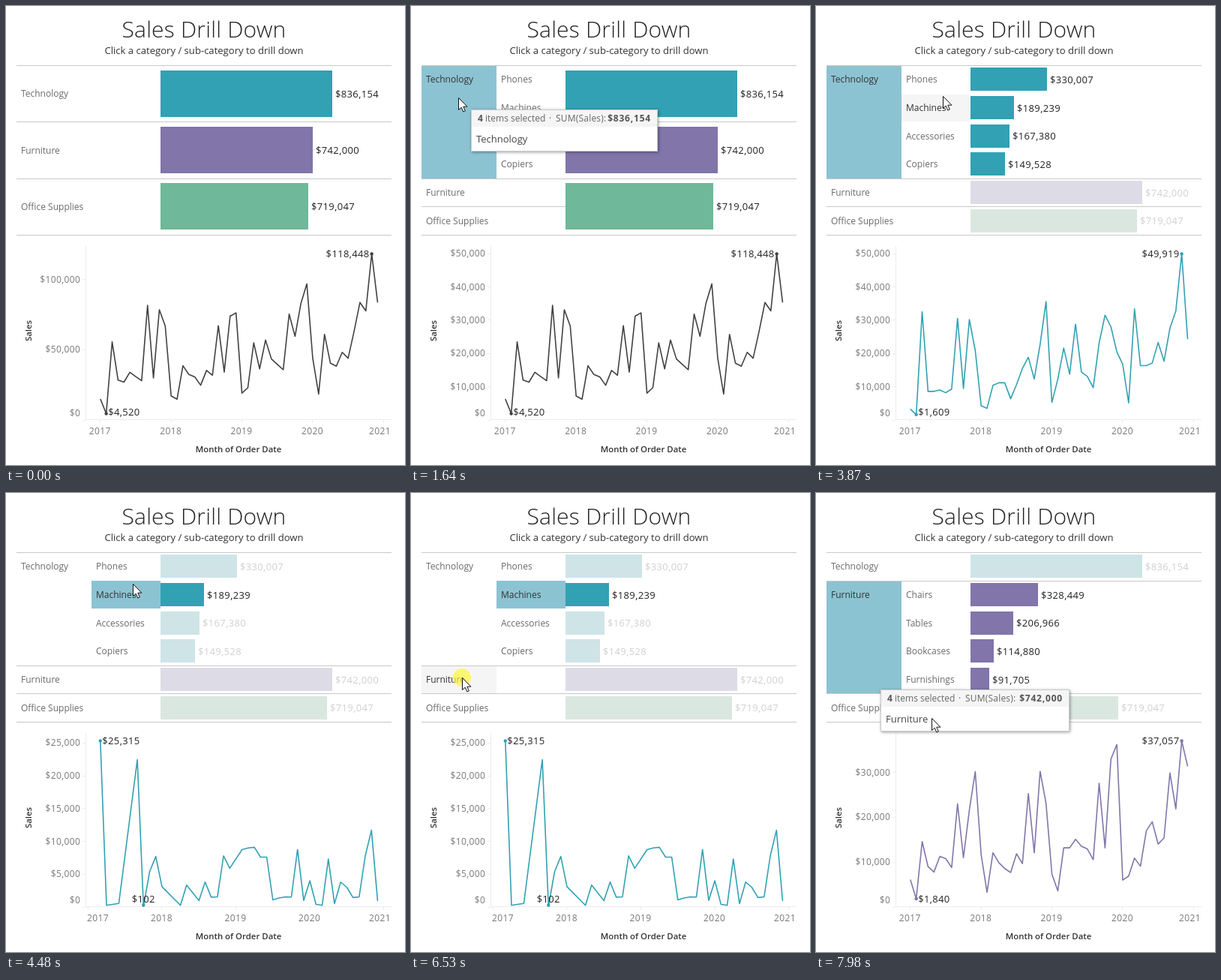
Write an HTML page with a canvas that moves like this. It is 532x612 px and loops after 8000 ms.

```html
<!DOCTYPE html>
<html lang="en">
<head>
<meta charset="utf-8">
<title>Sales Drill Down</title>
<style>
html, body { margin: 0; width: 100%; height: 100%; overflow: hidden; background: #fff; }
canvas { display: block; width: 532px; height: 612px; }
</style>
</head>
<body>
<canvas id="stage"></canvas>
<script>
const W = 532, H = 612, LOOP = 8000;
const canvas = document.getElementById("stage");
const ctx = canvas.getContext("2d");
const ratio = window.devicePixelRatio || 1;
canvas.width = W * ratio;
canvas.height = H * ratio;

const GROUPS = [
  { name: "Technology", color: "#31a1b3", pale: "#cfe4e7", total: 836154,
    items: [["Phones", 330007], ["Machines", 189239], ["Accessories", 167380], ["Copiers", 149528]] },
  { name: "Furniture", color: "#8175aa", pale: "#dddbe5", total: 742000,
    items: [["Chairs", 328449], ["Tables", 206966], ["Bookcases", 114880], ["Furnishings", 91705]] },
  { name: "Office Supplies", color: "#6fb899", pale: "#dae7e1", total: 719047, items: [] }
];

// Monthly sales in thousands: a season that grows each year, with a few outstanding months.
function yearly(season, growth, outliers) {
  return Array.from({ length: 48 }, (_, i) =>
    outliers[i] ?? season[i % 12] * (1 + growth * Math.floor(i / 12)));
}

// Sporadic sales: peaks above a slow ripple; null marks a month without sales.
function sporadic(count, idle, peaks) {
  const ripple = i => .9 + .65 * Math.cos((i - 30.4) * Math.PI * 2 / 11.7);
  return Array.from({ length: count }, (_, i) => idle.includes(i) ? null : peaks[i] ?? ripple(i));
}

const CHARTS = {
  all: {
    color: "#414141", step: 50, skip: 0,
    v: yearly([15, 13, 43, 28.5, 27, 34, 31, 28, 59, 30, 65, 67], .14,
      { 1: 4.52, 2: 55.7, 8: 81.8, 10: 78.6, 14: 38.7, 17: 24.8, 25: 23, 28: 57,
        33: 59.7, 35: 97, 36: 44, 43: 63, 45: 77.8, 46: 118.448, 47: 83.8 }),
    marks: [[46, "$118,448", "right"], [1, "$4,520", "left"]]
  },
  tech: {
    color: "#31a1b3", step: 10, skip: 0,
    v: yearly([3.3, 2.7, 13.5, 8.6, 8.6, 9, 8.2, 9.3, 14.5, 9.5, 17.5, 12.8], .3,
      { 1: 1.61, 2: 32.5, 8: 30.5, 10: 30.2, 11: 20.9, 14: 10.4, 17: 6.4, 19: 15.5, 23: 35.6,
        25: 12.3, 28: 28.8, 31: 9.7, 33: 31.5, 36: 16.7, 38: 33.4, 42: 23.3, 45: 32.8, 46: 49.919 }),
    marks: [[46, "$49,919", "right"], [1, "$1,609", "left"]]
  },
  mach: {
    color: "#31a1b3", step: 5, skip: 2,
    v: sporadic(46, [2, 4, 5, 11, 12, 15, 22],
      { 0: 25.315, 6: 22.45, 7: .1, 8: 5.4, 9: 7.7, 10: 3.1, 14: 3.35, 17: 3.8, 20: 7.8, 21: 5.9,
        23: 8.75, 24: 9, 25: 9.1, 26: 7.6, 27: 7.6, 32: 8.75, 34: 4, 37: 7.3, 39: 3.8, 40: 3,
        43: 7.8, 44: 11.7 }),
    marks: [[0, "$25,315", "left"], [7, "$102", "center"]]
  },
  furn: {
    color: "#8175aa", step: 10, skip: 0,
    v: yearly([6.1, 3, 11, 9, 7.8, 11.3, 10.8, 8.8, 23, 11, 27.5, 30.2], .1,
      { 1: 1.84, 2: 14.6, 10: 21.6, 12: 11.7, 17: 7.7, 23: 23.1, 27: 13.2, 28: 15.1, 36: 6, 37: 6.9,
        38: 10.9, 39: 9.1, 40: 17, 41: 19, 43: 15.4, 45: 21.9, 46: 37.057, 47: 31.4 }),
    marks: [[46, "$37,057", "right"], [1, "$1,840", "left"]]
  }
};

const VIEWS = {
  all: { chart: CHARTS.all },
  tech: { open: "Technology", pick: "Technology", chart: CHARTS.tech },
  mach: { open: "Technology", pick: "Machines", chart: CHARTS.mach },
  machIdle: { open: "Technology", chart: CHARTS.mach },
  furn: { open: "Furniture", pick: "Furniture", chart: CHARTS.furn }
};

// Start time, headers and axis, bars and line.
const STATES = [
  [0, "all", "all"], [1640, "tech", "all"], [1680, "tech", "tech"], [4480, "mach", "mach"],
  [6630, "machIdle", "mach"], [6920, "furn", "mach"], [6960, "furn", "furn"]
];

const TIPS = [
  { from: 1640, to: 3500, x: 80, y: 138, w: 249, title: "Technology", sum: "$836,154" },
  { from: 6920, to: LOOP, x: 86, y: 262, w: 252, title: "Furniture", sum: "$742,000" }
];

const CLICKS = [[1210, 1350], [4190, 4350], [6530, 6630]];

// Start time, end time, way points.
const MOVES = [
  [180, 920, [398, 606], [230, 425], [78, 240], [63, 122]],
  [2620, 3010, [63, 122], [170, 180]],
  [3410, 3900, [170, 180], [172, 72], [169, 121]],
  [5430, 6040, [169, 121], [175, 145], [102, 222], [68, 246]],
  [7450, 7980, [68, 246], [67, 272], [154, 300]]
];

const LEFT = 14, MID = 114, BARS = 206, RIGHT = 514, TOP = 79.5, DEPTH = 226;
const BASE = 552, RISE = 221.5, X0 = 125.8, SPAN = 369.7;

const money = n => "$" + n.toLocaleString("en-US");
const clamp = (n, lo, hi) => Math.min(hi, Math.max(lo, n));

function text(str, x, y, { size = 12, color = "#666", align = "left", weight = 400, gap = 0 } = {}) {
  ctx.font = `${weight} ${size}px "Open Sans", "Noto Sans", sans-serif`;
  ctx.letterSpacing = gap + "px";
  ctx.textAlign = align;
  ctx.fillStyle = color;
  ctx.fillText(str, x, y);
}

function rect(x, y, w, h, color) {
  ctx.fillStyle = color;
  ctx.fillRect(x, y, w, h);
}

function dot(x, y, r, color) {
  ctx.fillStyle = color;
  ctx.beginPath();
  ctx.arc(x, y, r, 0, Math.PI * 2);
  ctx.fill();
}

// Rows of the table, each with its group, label, amount and vertical place.
function rowsOf(view) {
  const rows = [];
  for (const group of GROUPS) {
    const open = group.name === view.open;
    const list = open ? group.items : [["", group.total]];
    list.forEach(([label, amount], i) => rows.push({ group, label, amount, open, first: i === 0 }));
  }
  const h = DEPTH / rows.length;
  rows.forEach((row, i) => Object.assign(row, { y: TOP + i * h, h, mid: TOP + (i + .5) * h }));
  return rows;
}

function cellsOf(view) {
  const cells = [];
  for (const { group, label, open, first, y, h, mid } of rowsOf(view)) {
    if (first) {
      const span = open ? h * group.items.length : h;
      cells.push({ name: group.name, x: LEFT, w: MID - LEFT, y, h: span, mid });
    }
    if (label) cells.push({ name: label, x: MID, w: BARS - MID, y, h, mid });
  }
  return cells;
}

const inside = (p, b) => p && p[0] >= b.x && p[0] < b.x + b.w && p[1] >= b.y && p[1] < b.y + b.h;

function separators(view, from, to) {
  const ys = rowsOf(view).filter(r => r.first).map(r => r.y).concat(TOP + DEPTH);
  for (const y of ys) rect(from, Math.floor(y), to - from, 1, "#c8c8c8");
}

function headers(view, pointer) {
  for (const cell of cellsOf(view)) {
    const picked = cell.name === view.pick;
    const hover = inside(pointer, cell);
    if (picked || hover) {
      const y = Math.floor(cell.y) + (picked && cell.x === MID ? 0 : 1);
      rect(cell.x, y, cell.w, Math.floor(cell.y + cell.h) - y, picked ? "#8cc3d2" : "#f5f5f5");
    }
    text(cell.name, cell.x + 6, Math.round(cell.mid + 4), { color: hover || picked ? "#333" : "#6a6a6a" });
  }
  separators(view, LEFT, BARS);
}

function bars(view) {
  const rows = rowsOf(view);
  const max = Math.max(...rows.map(r => r.amount));
  separators(view, BARS, RIGHT);
  for (const { group, label, amount, open, h, mid } of rows) {
    const live = !view.open || open && (view.pick === group.name || view.pick === label);
    const w = Math.round(229 * amount / max);
    const bh = Math.round(h * .823);
    rect(BARS, Math.floor(mid - bh / 2), w, bh, live ? group.color : group.pale);
    text(money(amount), BARS + w + 4, Math.round(mid + 4.5),
      { size: 13, color: live ? "#222" : "#d0d0d0", gap: .35 });
  }
}

function axes(chart) {
  const max = Math.max(...chart.v);
  const faint = "#ececec";
  rect(106, 320, 1, 232, faint);
  rect(106, 551, 408, 1, faint);
  for (let n = 0; n <= max + .1; n += chart.step) {
    const y = BASE - RISE * n / max;
    rect(102, Math.round(y - .5), 4, 1, faint);
    text(money(n * 1000), 99.3, Math.round(Math.min(y, 542.5) + 4), { color: "#787878", align: "right", gap: .4 });
  }
  for (let k = 0; k < 5; k++) {
    const x = X0 + (12 * k - chart.skip) * SPAN / (chart.v.length - 1);
    if (x > 107) rect(Math.round(x - .5), 552, 1, 4, faint);
    text(String(2017 + k), clamp(x - .5, 122.5, 498.5), 571, { color: "#787878", align: "center", gap: .4 });
  }
  const label = { color: "#333", align: "center", weight: 600, size: 11.4 };
  text("Month of Order Date", 310, 595, label);
  ctx.save();
  ctx.translate(34, 433);
  ctx.rotate(-Math.PI / 2);
  text("Sales", 0, 0, label);
  ctx.restore();
}

function line(chart) {
  const { v, color, marks } = chart;
  const max = Math.max(...v);
  const at = i => [X0 + i * SPAN / (v.length - 1), BASE - RISE * v[i] / max];
  ctx.strokeStyle = color;
  ctx.lineWidth = 1.6;
  ctx.lineJoin = "round";
  ctx.beginPath();
  v.forEach((n, i) => { if (n !== null) ctx.lineTo(...at(i)); });
  ctx.stroke();
  for (const [i, str, align] of marks) {
    const [x, y] = at(i);
    dot(x, Math.min(y, 549.5), 2.2, color);
    const shift = { left: 2.5, right: -3, center: 0 }[align];
    text(str, x + shift, Math.floor(Math.min(y, 541) + 5), { size: 13, color: "#222", align, gap: .35 });
  }
}

function tooltip({ x, y, w, title, sum }) {
  const h = 56;
  ctx.save();
  ctx.shadowColor = "rgba(0,0,0,.4)";
  ctx.shadowBlur = 4 * ratio;
  ctx.shadowOffsetX = ctx.shadowOffsetY = ratio;
  rect(x, y, w, h, "#fff");
  ctx.restore();
  rect(x, y, w, 23, "#f5f5f5");
  ctx.strokeStyle = "#ccc";
  ctx.lineWidth = 1;
  ctx.strokeRect(x + .5, y + .5, w - 1, h - 1);
  const base = y + 16;
  text("4", x + 9, base, { weight: 700, color: "#555" });
  text("items selected", x + 19, base);
  text("·", x + 104, base);
  text("SUM(Sales):", x + 113, base, { gap: .2 });
  text(sum, x + w - 9, base, { weight: 700, color: "#555", align: "right", gap: .8 });
  text(title, x + 7, y + 44, { size: 13, color: "#444" });
}

function pointerAt(t) {
  let pos = null;
  for (const [from, to, ...pts] of MOVES) {
    if (t < from) break;
    const p = clamp((t - from) / (to - from), 0, 1);
    const s = p * p * (3 - 2 * p) * (pts.length - 1);
    const i = Math.min(Math.floor(s), pts.length - 2);
    const [a, b] = [pts[i], pts[i + 1]];
    pos = a.map((n, k) => Math.round(n + (b[k] - n) * (s - i)));
  }
  return pos;
}

function arrow([x, y]) {
  const shape = [[0, 0], [0, 16], [3.7, 12.7], [6.3, 18.5], [8.8, 17.4], [6.3, 11.7], [11.4, 11.7]];
  ctx.beginPath();
  for (const [dx, dy] of shape) ctx.lineTo(x + .5 + dx, y + .5 + dy);
  ctx.closePath();
  ctx.fillStyle = "#fff";
  ctx.fill();
  ctx.strokeStyle = "#111";
  ctx.lineWidth = 1;
  ctx.lineJoin = "miter";
  ctx.stroke();
}

function draw(t) {
  ctx.setTransform(ratio, 0, 0, ratio, 0, 0);
  rect(0, 0, W, H, "#fff");
  const [, head, body] = STATES.filter(s => t >= s[0]).pop();
  const pointer = pointerAt(t);
  const tip = TIPS.find(b => t >= b.from && t < b.to);
  const covered = tip && inside(pointer, { ...tip, h: 56 });

  text("Sales Drill Down", 264, 42, { size: 30, color: "#222", align: "center", weight: 300, gap: .2 });
  text("Click a category / sub-category to drill down", 264, 64, { size: 13.1, color: "#333", align: "center" });
  headers(VIEWS[head], covered ? null : pointer);
  bars(VIEWS[body]);
  axes(VIEWS[head].chart);
  line(VIEWS[body].chart);
  if (tip) tooltip(tip);
  if (CLICKS.some(([a, b]) => t >= a && t < b)) dot(...pointer, 12, "rgba(255,246,60,.7)");
  if (pointer) arrow(pointer);
}

const start = performance.now();
function tick() {
  draw((performance.now() - start) % LOOP);
  requestAnimationFrame(tick);
}
tick();
</script>
</body>
</html>
```
